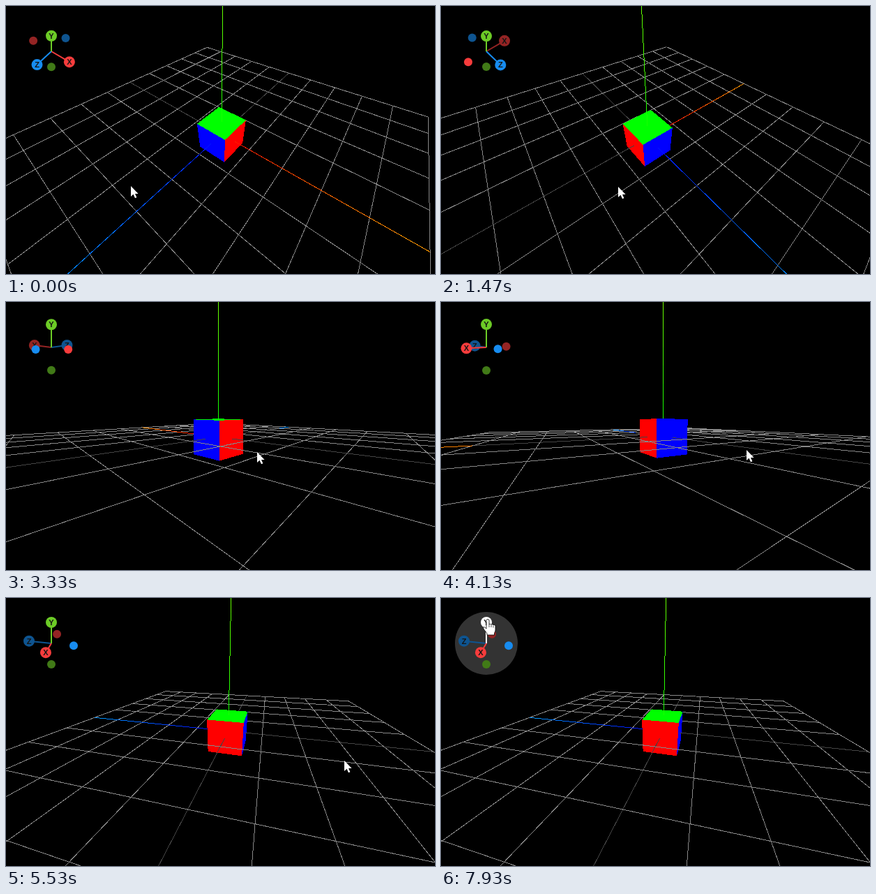
Animation of 615 by 384 pixels, one loop 8 s. Source, as an HTML page:

```html
<!DOCTYPE html>
<html lang="en">
<head>
<meta charset="utf-8">
<title>Orbit gizmo</title>
<style>
  html, body { margin: 0; width: 100%; height: 100%; overflow: hidden; background: #000; }
  svg { display: block; position: absolute; left: 0; top: 0; }
  text { font: bold 11px "Liberation Sans", Arial, sans-serif; text-anchor: middle; fill: #151515; }
</style>
</head>
<body>
<svg width="615" height="384" viewBox="0 0 615 384">
  <g id="scene" shape-rendering="crispEdges"></g>
  <g id="gizmo"></g>
  <g id="pointer"></g>
</svg>
<script>
const LOOP = 8000, TICK = 1000 / 15;
const FOCAL = 192 / Math.tan(37.5 * Math.PI / 180);
const DIST = 5.22, TARGET = [0.125, 0, 0.215], NEAR = 0.1;
const HALF = 5, BOX = 0.5;

// Pointer positions: [tick, x, y]; the camera follows the drag part.
const DRAG = [
  [0, 179, 258], [2, 173, 258], [4, 173, 258], [14, 206.5, 262.2],
  [27, 271, 257], [33, 271, 257], [34, 273.5, 256], [50, 360.2, 215.1],
  [62, 438, 212.2], [75, 475, 220], [77, 475, 220], [83, 486.9, 233.1]
];
const HOVER = [
  [83, 485, 233], [84, 485, 233], [92, 66, 91], [97, 66, 91], [100, 58, 79],
  [102, 58, 79], [106, 104, 68], [109, 104, 68], [114, 75, 56], [116, 75, 56], [119, 67, 31]
];
const DRAG_START = 4, DRAG_END = 83;

// Where the axes win over the grid: [tick, x from, z from].
const AXIS_FROM = [[0, 0, 0], [47, 0, 4], [56, 4, 2], [76, 5, 0]];

const AXES = [
  { name: "X", dir: [1, 0, 0], colors: ["#f73c3c", "#942424"] },
  { name: "Y", dir: [0, 1, 0], colors: ["#6ccb26", "#417a17"] },
  { name: "Z", dir: [0, 0, 1], colors: ["#178cf0", "#0e5490"] }
];
const FACES = ["#f00", "#0f0", "#00f"];
const HUB = 65, ARM = 33, DISC = 45;

const ARROW = '<path d="M0 0V15L3.5 11.8L6 17.2L8.4 16.2L6 11H10.6Z" fill="#fff"/>';
const HAND = '<path d="M-2 1.5a2 2 0 0 1 4 0V7c0-1 3-1 3 .5c0-1 3-1 3 .5c0-1 3-.5 3 1v6' +
  'c0 2-1.5 3-1.5 5v2H-1v-2c-1-2-4-5-5-7s1-3 2.5-1.5L-2 13Z" fill="#fff" stroke="#000" stroke-width=".8"/>' +
  '<path d="M2 7v4M5 8v3M8 8.5v3" stroke="#000" stroke-width=".7"/>';

const byId = id => document.getElementById(id);
const clamp = (v, lo, hi) => Math.min(hi, Math.max(lo, v));
const rad = deg => deg * Math.PI / 180;
const fix = v => v.toFixed(2);

// Monotone cubic through the keys.
function follow(keys, k) {
  const last = keys.length - 1;
  k = clamp(k, keys[0][0], keys[last][0]);
  let i = 0;
  while (i < last - 1 && k > keys[i + 1][0]) i++;
  const slope = (j, c) => (keys[j + 1][c] - keys[j][c]) / (keys[j + 1][0] - keys[j][0]);
  const tangent = (j, c) => {
    if (j === 0 || j === last) return 0;
    const a = slope(j - 1, c), b = slope(j, c);
    return a * b > 0 ? 2 * a * b / (a + b) : 0;
  };
  const span = keys[i + 1][0] - keys[i][0], u = (k - keys[i][0]) / span;
  return [1, 2].map(c =>
    keys[i][c] * (1 + 2 * u) * (1 - u) ** 2 + keys[i + 1][c] * u * u * (3 - 2 * u) +
    span * (tangent(i, c) * u * (1 - u) ** 2 - tangent(i + 1, c) * u * u * (1 - u)));
}

function makeCamera([x, y]) {
  const az = rad(38.4 - 0.9375 * (x - 173)), el = rad(47.6 + 0.9375 * (y - 258));
  const sa = Math.sin(az), ca = Math.cos(az), se = Math.sin(el), ce = Math.cos(el);
  // Returns [right, up, toward the viewer].
  const turn = ([px, py, pz]) => {
    const out = sa * px + ca * pz;
    return [ca * px - sa * pz, ce * py - se * out, ce * out + se * py];
  };
  const view = p => {
    const [r, u, t] = turn(p.map((v, i) => v - TARGET[i]));
    return [r, u, DIST - t];
  };
  const eye = [sa * ce, se, ca * ce].map((v, i) => v * DIST + TARGET[i]);
  return { turn, view, eye };
}

const toScreen = ([r, u, d]) => fix(307.5 + FOCAL * r / d) + " " + fix(192 - FOCAL * u / d);

function segment(cam, a, b) {
  let p = cam.view(a), q = cam.view(b);
  if (p[2] < NEAR && q[2] < NEAR) return "";
  const cut = (from, to) => {
    const u = (NEAR - from[2]) / (to[2] - from[2]);
    return from.map((v, i) => v + (to[i] - v) * u);
  };
  if (p[2] < NEAR) p = cut(p, q);
  else if (q[2] < NEAR) q = cut(q, p);
  return "M" + toScreen(p) + "L" + toScreen(q);
}

// True when a cube face plane parts the piece and the eye from the cube.
const inFront = (eye, a, b) => [0, 1, 2].some(i => [1, -1].some(s =>
  eye[i] * s > BOX && a[i] * s >= BOX && b[i] * s >= BOX));

function cubeMarkup(cam) {
  let out = "";
  for (let i = 0; i < 3; i++) for (const s of [1, -1]) {
    if (cam.eye[i] * s <= BOX) continue;
    const pts = [[-1, -1], [1, -1], [1, 1], [-1, 1]].map(([m, n]) => {
      const p = [];
      p[i] = s * BOX;
      p[(i + 1) % 3] = m * BOX;
      p[(i + 2) % 3] = n * BOX;
      return toScreen(cam.view(p));
    });
    out += `<polygon points="${pts.join(" ")}" fill="${FACES[i]}"/>`;
  }
  return out;
}

function axisColor(i, h) {
  const mix = Math.round(153 * h / HALF);
  return `rgb(${[[255, mix, 0], [mix, 255, 0], [0, mix, 255]][i]})`;
}

function drawScene(cam, k) {
  const layers = ["", ""];
  const add = (a, b, color) => {
    const d = segment(cam, a, b);
    if (d) layers[+inFront(cam.eye, a, b)] += `<path d="${d}" stroke="${color}"/>`;
  };
  const cuts = [-HALF, -BOX, BOX, HALF];
  const gridLine = (n, color) => {
    for (let j = 0; j < 3; j++) {
      add([n, 0, cuts[j]], [n, 0, cuts[j + 1]], color);
      add([cuts[j], 0, n], [cuts[j + 1], 0, n], color);
    }
  };
  gridLine(0, "#444");
  for (let n = 1; n <= HALF; n++) [n, -n].forEach(v => gridLine(v, "#888"));

  const from = AXIS_FROM.filter(row => row[0] <= k).pop();
  const starts = [from[1], 0, from[2]];
  AXES.forEach(({ dir }, i) => {
    for (let h = starts[i]; h < HALF; h += BOX) {
      add(dir.map(v => v * h), dir.map(v => v * (h + BOX)), axisColor(i, h + BOX / 2));
    }
  });
  byId("scene").innerHTML = layers[0] + cubeMarkup(cam) + layers[1];
}

function drawGizmo(cam, mouse, hovering) {
  const bubbles = AXES.flatMap(axis => [1, -1].map(s => {
    const [r, u, z] = cam.turn(axis.dir.map(v => v * s));
    return { x: HUB + ARM * r, y: HUB - ARM * u, z, size: s > 0 ? 8 : 6,
      label: s > 0 ? axis.name : "", color: axis.colors[z >= -0.01 ? 0 : 1] };
  })).sort((a, b) => a.z - b.z);

  let picked = null, best = Infinity;
  if (hovering) for (const b of bubbles) {
    const gap = Math.hypot(mouse[0] - b.x, mouse[1] - b.y);
    if (gap < best || gap < b.size) { best = gap; picked = b; }
  }
  let out = hovering ? `<circle cx="${HUB}" cy="${HUB}" r="${DISC}" fill="#333"/>` : "";
  for (const b of bubbles) {
    const color = b === picked ? "#fff" : b.color, x = fix(b.x), y = fix(b.y);
    if (b.label) out += `<path d="M${HUB} ${HUB}L${x} ${y}" stroke="${color}" stroke-width="2"/>`;
    out += `<circle cx="${x}" cy="${y}" r="${b.size}" fill="${color}"/>`;
    if (b.label) out += `<text x="${x}" y="${fix(b.y + 4)}">${b.label}</text>`;
  }
  byId("gizmo").innerHTML = out;
}

function render(k) {
  const cam = makeCamera(follow(DRAG, clamp(k, DRAG_START, DRAG_END)));
  const mouse = follow(k < DRAG_END ? DRAG : HOVER, k).map(Math.round);
  const hovering = Math.hypot(mouse[0] - HUB, mouse[1] - HUB) < DISC;
  drawScene(cam, k);
  drawGizmo(cam, mouse, hovering);
  byId("pointer").innerHTML = `<g transform="translate(${mouse})">${hovering ? HAND : ARROW}</g>`;
}

const begin = performance.now();
let shown = -1;
function loop() {
  const t = (performance.now() - begin) % LOOP;
  const k = Math.floor((t + 5) / TICK) % Math.round(LOOP / TICK);
  if (k !== shown) render(shown = k);
  requestAnimationFrame(loop);
}
loop();
</script>
</body>
</html>
```
